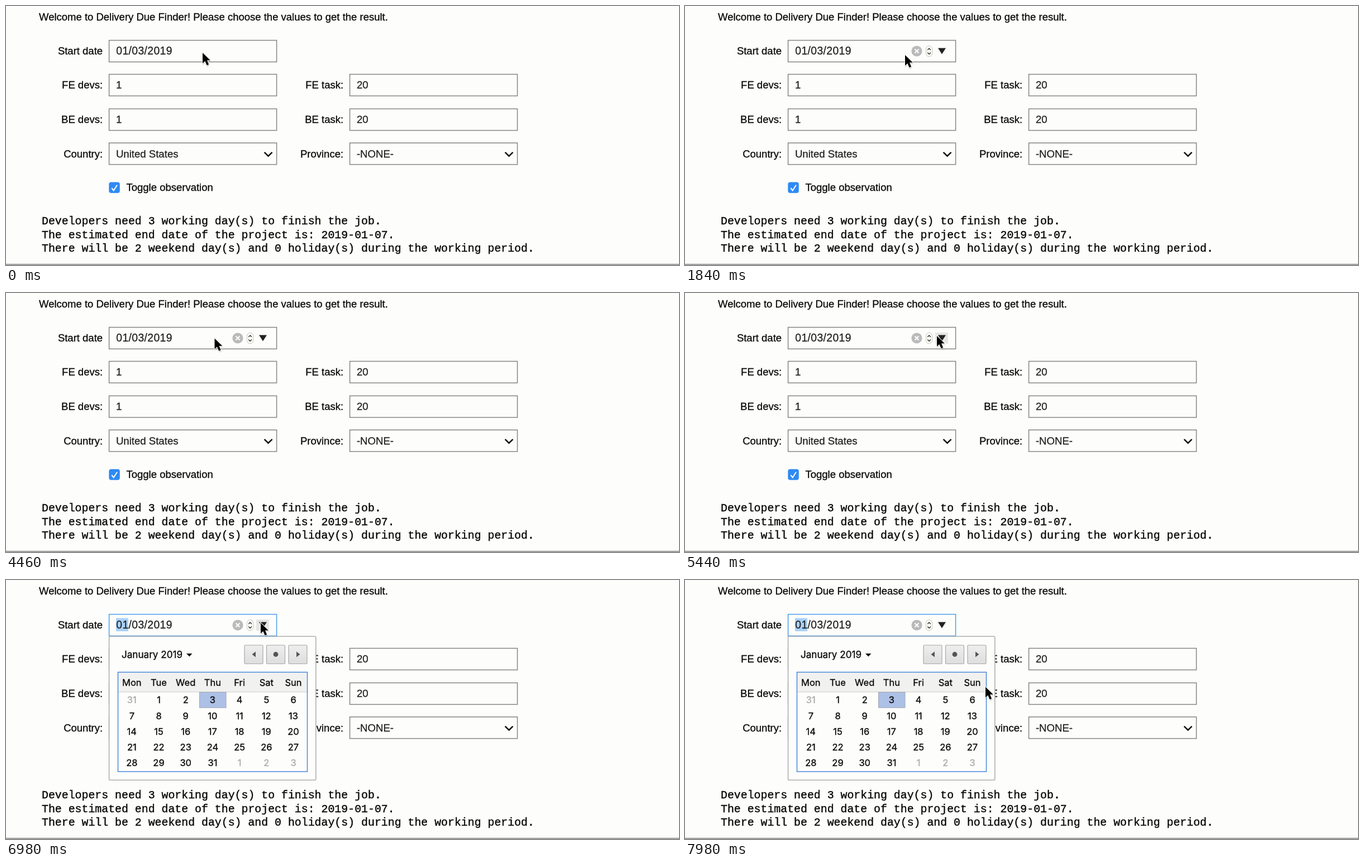
Recreate the animation shown at these times as an HTML page. Size 1205x465 px, loop 8 s.

```html
<!DOCTYPE html>
<html lang="en">
<head>
<meta charset="utf-8">
<title>Delivery Due Finder</title>
<style>
  html, body { margin: 0; width: 100%; height: 100%; overflow: hidden; background: #fdfdfb; }
  svg { display: block; width: 1205px; height: 465px; }
  text {
    --ink: #080808;
    font: 18.5px "Liberation Sans", Arial, sans-serif;
    fill: var(--ink); stroke: var(--ink); stroke-width: .3px;
    white-space: pre;
  }
  .value { --ink: #222; font-size: 18.6px; }
  .date { font-size: 19.3px; letter-spacing: .4px; }
  .mono { font: 19.86px "Liberation Mono", "Courier New", monospace; stroke-width: .4px; }
  .cal { font: 16.5px Inter, sans-serif; }
  .month { font-size: 17.1px; }
  .dim { --ink: #aaa; }
  .end { text-anchor: end; }
  .mid { text-anchor: middle; }
  .field { fill: #fdfdfb; stroke: #868686; stroke-width: 1.5; }
  .focused { stroke: #4a9df0; }
  .line { fill: none; stroke: #111; stroke-width: 2.6; }
</style>
</head>
<body>
<svg id="stage" viewBox="0 0 1205 465">
  <defs>
    <linearGradient id="face" x2="0" y2="1">
      <stop offset="0" stop-color="#eee"/>
      <stop offset="1" stop-color="#dedede"/>
    </linearGradient>
  </defs>
</svg>
<script>
const LOOP = 8000, SHOW_ICONS = 60, OPEN = 6240;
const HOVER = [5330, 7590];

// Pointer tip: time, x, y
const PATH = [
  [0, 352, 84], [20, 352, 84], [400, 370, 89], [820, 387, 85], [1200, 392, 81],
  [1560, 393, 85], [1840, 394, 88], [2400, 393, 86], [2900, 388, 83],
  [3520, 383, 81], [4080, 378, 81], [4460, 373.5, 81.5], [4920, 397, 78],
  [5440, 451, 77], [5760, 455, 77], [6980, 456, 77], [7500, 457, 78],
  [7760, 498, 131], [7980, 538, 192], [8000, 538, 192]
];

const stage = document.getElementById("stage");

function add(parent, tag, attrs, text) {
  const node = document.createElementNS("http://www.w3.org/2000/svg", tag);
  for (const key in attrs) node.setAttribute(key, attrs[key]);
  if (text !== undefined) node.textContent = text;
  parent.append(node);
  return node;
}
const group = () => add(stage, "g", {});
const label = (parent, x, y, text, cls = "") => add(parent, "text", { x, y, class: cls }, text);
const box = (parent, x, y, width, height, attrs) => add(parent, "rect", { x, y, width, height, ...attrs });
const path = (parent, d, attrs) => add(parent, "path", { d, ...attrs });
const show = (node, on) => { node.style.visibility = on ? "visible" : "hidden"; };

function field(x, y, name, value, isSelect) {
  const base = y + (isSelect ? 26 : 25);
  label(stage, x - 11.5, base, name, "end");
  const frame = box(stage, x, y, 300, 38.8, { class: "field" });
  if (value) label(stage, x + 12.3, base, value, "value");
  if (isSelect) path(stage, `M${x + 278} ${y + 16.8}l7 6.8l7 -6.8`, { class: "line" });
  return frame;
}

function buildForm() {
  label(stage, 59, 25.5, "Welcome to Delivery Due Finder! Please choose the values to get the result.");
  const date = field(184.6, 61.6, "Start date");
  field(184.6, 122.6, "FE devs:", "1");
  field(615.6, 122.6, "FE task:", "20");
  field(184.6, 184.6, "BE devs:", "1");
  field(615.6, 184.6, "BE task:", "20");
  field(184.6, 245.8, "Country:", "United States", true);
  field(615.6, 245.8, "Province:", "-NONE-", true);
  box(stage, 184.3, 316.3, 19.5, 19.5, { rx: 4, fill: "#2f8af3" });
  path(stage, "M189.3 326.8l3.4 4.4l6.3 -9.7", { class: "line", style: "stroke:#fff;stroke-width:2" });
  label(stage, 215.5, 332, "Toggle observation");
  [
    "Developers need 3 working day(s) to finish the job.",
    "The estimated end date of the project is: 2019-01-07.",
    "There will be 2 weekend day(s) and 0 holiday(s) during the working period."
  ].forEach((text, i) => label(stage, 64, 392.3 + 24.2 * i, text, "mono"));
  box(stage, 0, 463, 1205, 1.4, { fill: "#777" });
  return date;
}

function buildIcons() {
  const g = group();
  add(g, "circle", { cx: 415, cy: 81, r: 9.6, fill: "#bababa" });
  path(g, "M411.5 77.5l7 7m0 -7l-7 7", { stroke: "#fff", "stroke-width": 2 });
  box(g, 431.6, 71.5, 11, 19.5, { rx: 5.5, fill: "#fffffa", stroke: "#c5c5b8" });
  path(g, "M434.3 79l2.8 -3l2.8 3m-5.6 4.5l2.8 3l2.8 -3", { class: "line", style: "stroke:#333;stroke-width:1.5" });
  const hover = box(g, 448, 71, 23, 20, { fill: "#e6e6e5" });
  path(g, "M453 75.5h14l-7 11z", { fill: "#222" });
  return { icons: g, hover };
}

function buildCalendar() {
  const g = group();
  box(g, 184.6, 101.2, 370.2, 258, { rx: 2, fill: "#fdfdfb", stroke: "#b0b0b0", "stroke-width": 1.6 });
  label(g, 207, 140.4, "January 2019", "cal month");
  path(g, "M323 132h10.5l-5.2 5.6z", { fill: "#111" });
  [427, 466.5, 506].forEach(x =>
    box(g, x, 117, 33, 33.5, { rx: 1.5, fill: "url(#face)", stroke: "#a8a8a8", "stroke-width": 1.2 }));
  path(g, "M447 128.5v10l-6.5 -5zM520 128.5v10l6.5 -5z", { fill: "#555" });
  add(g, "circle", { cx: 483, cy: 133.5, r: 4.4, fill: "#555" });

  box(g, 200.5, 165.5, 339, 35.5, { fill: "#f1f1ef" });
  box(g, 201, 200.5, 338, 1, { fill: "#ccc" });
  box(g, 346.5, 201.5, 47.5, 27.7, { fill: "#adc0e6", stroke: "#a0a6b2" });
  box(g, 200.5, 165.5, 339, 178.5, { fill: "none", stroke: "#3f82df", "stroke-width": 1.4 });
  const colX = col => 225.3 + 48.2 * col;
  "Mon Tue Wed Thu Fri Sat Sun".split(" ").forEach((day, i) => label(g, colX(i), 190, day, "cal mid"));
  for (let i = 0; i < 35; i++) {
    const outside = i < 1 || i > 31;
    const day = (i + 30) % 31 + 1;
    label(g, colX(i % 7), 221.2 + 28.3 * Math.floor(i / 7), day, "cal mid" + (outside ? " dim" : ""));
  }
  return g;
}

function buildCursor() {
  const g = group();
  const shape = "M0 0V19L4.4 15L7.6 22.5L11.2 21L8 13.6H13.8Z";
  path(g, shape, { transform: "translate(.6 2)", opacity: .22, stroke: "#000", "stroke-width": 2, "stroke-opacity": .3 });
  path(g, shape, { stroke: "#fff", "stroke-width": 1.8, "paint-order": "stroke" });
  return g;
}

const dateField = buildForm();
const selection = box(stage, 197, 68.5, 22, 23.5, { fill: "#a9d2fb" });
label(stage, 197.3, 86.6, "01/03/2019", "value date");
const { icons, hover } = buildIcons();
const calendar = buildCalendar();
const cursor = buildCursor();

function pointerAt(t) {
  const i = Math.max(1, PATH.findIndex(p => p[0] > t));
  const [t0, x0, y0] = PATH[i - 1], [t1, x1, y1] = PATH[i];
  const u = (t - t0) / (t1 - t0), k = u * u * (3 - 2 * u);
  return [x0 + (x1 - x0) * k, y0 + (y1 - y0) * k];
}

function draw(t) {
  const open = t >= OPEN;
  show(icons, t >= SHOW_ICONS);
  hover.style.display = t >= HOVER[0] && t < HOVER[1] ? "" : "none";
  show(selection, open);
  show(calendar, open);
  dateField.classList.toggle("focused", open);
  cursor.setAttribute("transform", `translate(${pointerAt(t)})`);
}

const start = performance.now();
function tick() {
  draw((performance.now() - start) % LOOP);
  requestAnimationFrame(tick);
}
draw(0);
requestAnimationFrame(tick);
</script>
</body>
</html>
```
